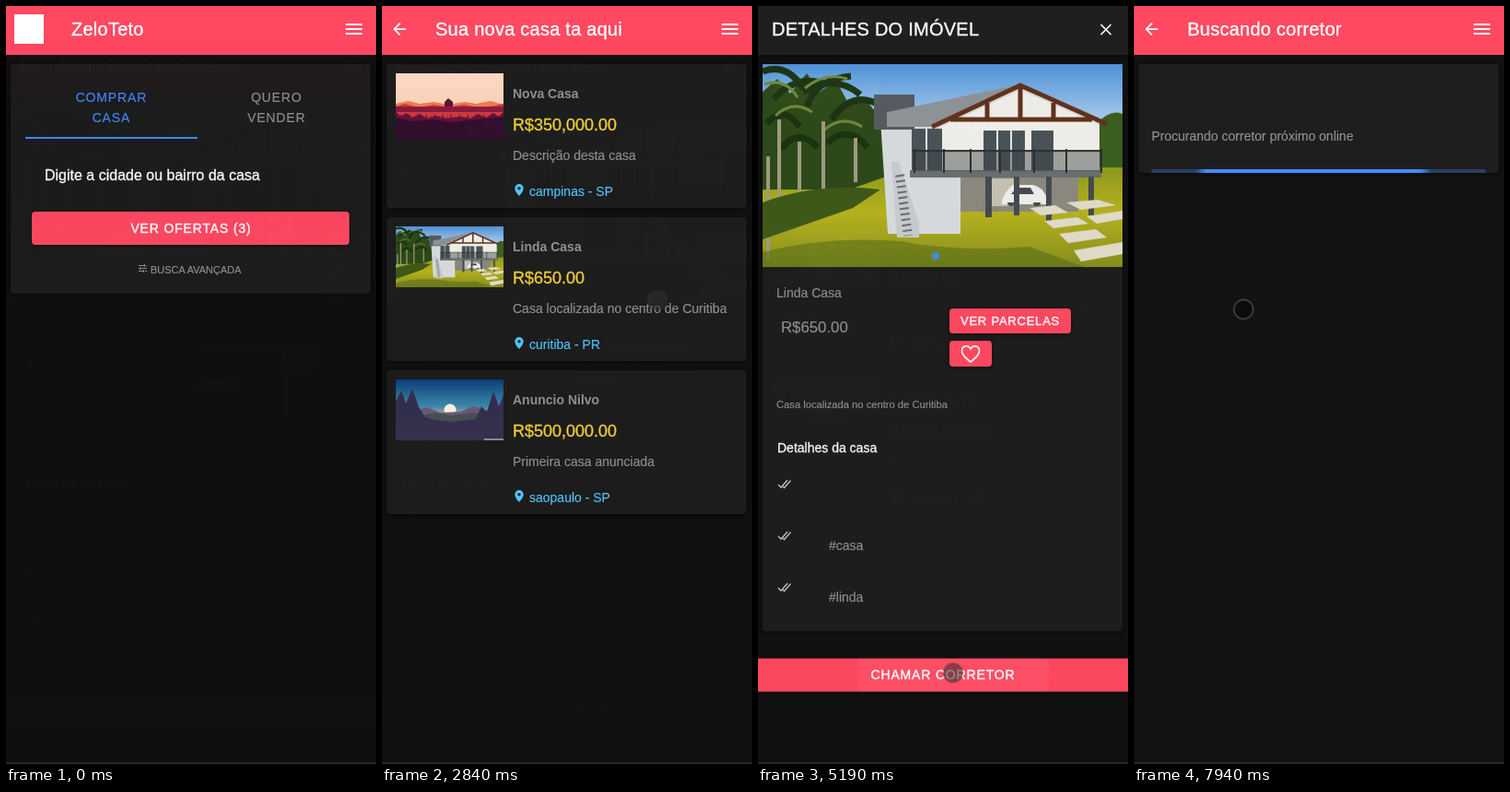
An HTML page for the animation above (8000 ms loop, 402x822 px).

```html
<!DOCTYPE html>
<html lang="pt-BR">
<head>
<meta charset="utf-8">
<title>Casas</title>
<style>
html, body { margin: 0; width: 100%; height: 100%; overflow: hidden; background: #121212; }
svg.stage { display: block; width: 402px; height: 822px; }
text {
  font: 14px "Liberation Sans", Arial, sans-serif;
  color: #929292; fill: currentColor; stroke: currentColor; stroke-width: .15px;
}
.title { font-size: 20px; letter-spacing: .0125em; color: #fff; stroke-width: .35px; }
.caps { letter-spacing: .06em; text-anchor: middle; }
.white { color: #fff; fill: #fff; stroke-width: .3px; }
.caps.white { stroke-width: .4px; }
.blue { color: #428cff; fill: #428cff; }
.pink { fill: #ff4961; }
.button { fill: #ff4961; filter: drop-shadow(0 1px 2px rgba(0, 0, 0, .4)); }
.page { fill: #121212; }
.card { fill: #1e1e1e; filter: drop-shadow(0 1px 2px rgba(0, 0, 0, .5)); }
.name { font-weight: bold; stroke: none; }
.price { font-size: 18px; color: #f6d238; stroke-width: .3px; }
.place { color: #50c8ff; fill: #50c8ff; }
.line { fill: none; stroke: #fff; stroke-width: 2; }

/* Delays are times within the 8 s loop; the script rewinds them all. */
#list { animation: rise 280ms 1268ms cubic-bezier(.36, .66, .04, 1) both; }
#offers { animation: show 1ms 1700ms both; }
#search { animation: rise 280ms 5180ms cubic-bezier(.36, .66, .04, 1) both; }
#detail {
  animation: rise 280ms 2870ms cubic-bezier(.36, .66, .04, 1) both,
    sink 200ms 5185ms cubic-bezier(.47, 0, .745, .715) forwards;
}
#shade {
  animation: shade 200ms 1262ms ease-in-out both,
    shade 200ms 1700ms ease-in-out reverse forwards;
}
#loading {
  transform-origin: 201px 409px;
  filter: drop-shadow(0 8px 10px rgba(0, 0, 0, .5));
  animation: pop 200ms 1262ms ease-in-out both, unpop 200ms 1700ms ease-in-out forwards;
}
#spinner { transform-origin: 150px 408px; animation: spin 750ms 1350ms linear infinite both; }
.ripple {
  fill: #fff; transform-box: fill-box; transform-origin: center;
  animation: grow 225ms var(--at) cubic-bezier(.4, 0, .2, 1) both, flash 400ms var(--at) both;
}
#pointer circle {
  fill: rgba(12, 12, 12, .92); stroke: rgba(84, 84, 84, .65); stroke-width: 1.8;
  animation: press 140ms 1080ms, press 70ms 2840ms, press 200ms 5050ms;
}
#pointer g { animation: show 1ms 250ms both; }

.first, .second { animation: 2044ms 5180ms linear infinite both; }
.first { animation-name: move1; }
.second { animation-name: move2; }
.first rect, .second rect {
  transform-box: fill-box; transform-origin: center;
  animation: 2044ms 5180ms linear infinite both;
}
.first rect { animation-name: size1; }
.second rect { animation-name: size2; }

@keyframes rise { from { opacity: .01; transform: translateY(40px); } to { opacity: 1; transform: none; } }
@keyframes sink { from { opacity: .99; transform: none; } to { opacity: 0; transform: translateY(40px); } }
@keyframes show { from { opacity: 0; } }
@keyframes shade { from { opacity: 0; } to { opacity: .32; } }
@keyframes pop { from { opacity: .01; transform: scale(1.1); } to { opacity: 1; transform: none; } }
@keyframes unpop { from { opacity: 1; transform: none; } to { opacity: 0; transform: scale(.9); } }
@keyframes spin { to { transform: rotate(360deg); } }
@keyframes grow { to { transform: translate(var(--dx), var(--dy)) scale(2.07); } }
@keyframes flash { 0%, 100% { opacity: 0; } 20%, 60% { opacity: .08; } }
@keyframes press { from, to { fill: rgba(50, 45, 47, .55); stroke: rgba(70, 60, 62, .25); } }
@keyframes move1 {
  0% { transform: translateX(0); }
  20% { transform: translateX(0); animation-timing-function: cubic-bezier(.5, 0, .701732, .495819); }
  59.15% { transform: translateX(.8367142px); animation-timing-function: cubic-bezier(.302435, .381352, .55, .956352); }
  100% { transform: translateX(2.0061106px); }
}
@keyframes size1 {
  0% { transform: scaleX(.08); }
  36.65% { transform: scaleX(.08); animation-timing-function: cubic-bezier(.334731, .12482, .785844, 1); }
  69.15% { transform: scaleX(.661479); animation-timing-function: cubic-bezier(.06, .11, .6, 1); }
  100% { transform: scaleX(.08); }
}
@keyframes move2 {
  0% { transform: translateX(0); animation-timing-function: cubic-bezier(.15, 0, .515058, .409685); }
  25% { transform: translateX(.3765191px); animation-timing-function: cubic-bezier(.31033, .284058, .8, .733712); }
  48.35% { transform: translateX(.8438617px); animation-timing-function: cubic-bezier(.4, .627035, .6, .902026); }
  100% { transform: translateX(1.6027778px); }
}
@keyframes size2 {
  0% { transform: scaleX(.08); animation-timing-function: cubic-bezier(.205028, .057051, .57661, .453971); }
  19.15% { transform: scaleX(.457104); animation-timing-function: cubic-bezier(.152313, .196432, .648374, 1.004315); }
  44.15% { transform: scaleX(.72796); animation-timing-function: cubic-bezier(.257759, -.003163, .211762, 1.38179); }
  100% { transform: scaleX(.08); }
}
</style>
</head>
<body>
<svg class="stage" viewBox="0 0 402 822">
  <defs>
    <linearGradient id="day" x2="0" y2="1"><stop stop-color="#4f94da"/><stop offset=".45" stop-color="#e6f0f8"/></linearGradient>
    <linearGradient id="dawn" x2="0" y2="1"><stop stop-color="#fddcc4"/><stop offset="1" stop-color="#fdd0b2"/></linearGradient>
    <linearGradient id="night" x2="0" y2="1"><stop stop-color="#0d3f7a"/><stop offset=".45" stop-color="#3f8cae"/><stop offset=".6" stop-color="#d9a59a"/></linearGradient>
    <linearGradient id="lawn" x2="0" y2="1"><stop stop-color="#8f9a1e"/><stop offset=".45" stop-color="#b9b420"/><stop offset="1" stop-color="#868f1c"/></linearGradient>
    <pattern id="firs" width="9" height="14" patternUnits="userSpaceOnUse">
      <path d="M0 14V9l2-5 2 5 2-8 3 9v4z" fill="#8c1c3c"/>
    </pattern>
    <clipPath id="offerClip"><rect x="28" y="223" width="345" height="36" rx="4"/></clipPath>
    <clipPath id="callClip"><rect y="707.5" width="402" height="36"/></clipPath>

    <g id="bar">
      <rect class="pink" width="402" height="53"/>
      <path class="line" d="M369 20h18M369 25h18M369 30h18"/>
    </g>
    <path id="back" fill="#fff" transform="translate(8.5 14.5) scale(.875)" d="M20 11H7.83l5.59-5.59L12 4l-8 8 8 8 1.41-1.41L7.83 13H20z"/>
    <path id="pin" class="place" fill-rule="evenodd" d="M149 193a4.700 4.700 0 0 0-4.700 4.700c0 3.500 4.700 8.300 4.700 8.300s4.700-4.800 4.700-8.300a4.700 4.700 0 0 0-4.700-4.700zm0 3a1.700 1.700 0 1 1 0 3.400 1.700 1.700 0 0 1 0-3.400z"/>
    <path id="checks" fill="none" stroke="#ccc" stroke-width="1.200" d="M22 519l3 3 7-8M27 521l1.500 1.500 7-8"/>

    <symbol id="house" viewBox="0 0 391 220" preserveAspectRatio="none">
      <rect width="391" height="220" fill="url(#day)"/>
      <path fill="#3c5f20" d="M335 80q10-16 25-12 16-20 31-14v66h-56z"/>
      <rect y="112" width="391" height="108" fill="url(#lawn)"/>
      <path fill="#2e4a1a" d="M0 30l16-14 14 16 18-22 14 20 18-12 14 26 16-8 24 30v56l-40 14H0z"/>
      <path fill="none" stroke="#1d3413" stroke-width="7" d="M0 8q26-10 44 18M12 38q25-28 58-16M48 46q10-30 48-33M44 30q35-20 62 3M75 60q20-30 48-18M4 64q20-20 36 4M20 92q18-24 40-2M70 86q22-22 44 4"/>
      <path fill="none" stroke="#6f8a3c" stroke-width="3" d="M2 22q22-8 36 14M46 26q22-18 46-10M14 56q18-18 40-4M66 72q20-18 42-4"/>
      <path fill="none" stroke="#a09c80" stroke-width="4" d="M6 100v112M18 60v110M40 84v66M66 62v80M101 80v48"/>
      <path fill="#3f5a1a" d="M0 150q60-22 128-14l-30 20-98 34z"/>
      <path fill="#5d7019" d="M0 204q70-18 150-12 60 12 140 6l60 22H0z" opacity=".6"/>
      <path fill="#d9dcdf" d="M128 60h62l90-34 86 36v60H215v62h-79z"/>
      <path fill="#565c60" d="M121 33h44v38h-44z"/>
      <path fill="#8e9498" d="M135 52l145-30-92 46h-53z"/>
      <path fill="#f1efe9" d="M194 68l86-40 86 38v50H194z"/>
      <path fill="none" stroke="#63321c" stroke-width="5" d="M184 68l96-45 94 42M204 60h154M244 42v18M280 25v35M316 42v18"/>
      <path fill="#4a5459" d="M162 70h33v48h-33zM240 72h45v46h-45zM292 72h24v46h-24z"/>
      <path fill="none" stroke="#e6e8e8" stroke-width="2" d="M178 70v48M255 72v46M270 72v46"/>
      <path fill="#8c8a7e" d="M215 122h128v38H215z"/>
      <path fill="#c6c2b4" d="M246 124h28v30h-28z"/>
      <path fill="#efefec" d="M260 148q3-10 12-17h22q10 2 15 14v7h-49z"/>
      <path fill="#444b50" d="M270 141l6-7h15l4 7zM266 150a4 4 0 0 0 8 0zM294 150a4 4 0 0 0 8 0z"/>
      <path fill="#6b7073" d="M160 115h208v8H160z"/>
      <path fill="#3a4044" opacity=".45" d="M163 94h206v22H163z"/>
      <path fill="none" stroke="#2c3134" stroke-width="2" d="M163 94h206M165 92v26M197 92v26M226 92v26M258 92v26M295 92v26M330 92v26M368 92v26"/>
      <path fill="#454b4f" d="M242 122h7v44h-7zM273 122h6v42h-6zM308 122h6v50h-6zM354 122h6v42h-6z"/>
      <path fill="#c9cdce" d="M140 106h8l22 66v16h-24z"/>
      <path fill="none" stroke="#666d70" stroke-width="10" stroke-dasharray="2 4" d="M149 120l9 66"/>
      <path fill="#e2ddca" d="M290 156l28-3 14 8-30 3zM330 150l34-3 20 6-38 5zM306 170l36-4 12 7-38 5zM352 165l39-6v9l-28 5zM322 184l40-5 12 9-42 6zM338 202l53-9v13l-45 8z"/>
    </symbol>
  </defs>

  <g id="home">
    <rect class="page" width="402" height="822"/>
    <use href="#bar"/>
    <rect x="9" y="9" width="32" height="32" fill="#fff"/>
    <text class="title" x="71" y="32">ZeloTeto</text>
    <rect class="card" x="5" y="63" width="391" height="249" rx="4"/>
    <text class="caps blue" x="114.400" y="104">COMPRAR</text>
    <text class="caps blue" x="114.400" y="126">CASA</text>
    <text class="caps" x="293.900" y="104">QUERO</text>
    <text class="caps" x="293.900" y="126">VENDER</text>
    <rect class="blue" x="21" y="142" width="187" height="2"/>
    <text class="white" x="42" y="189" style="font-size:16px">Digite a cidade ou bairro da casa</text>
    <rect class="button" x="28" y="223" width="345" height="36" rx="4"/>
    <text class="caps white" x="201" y="246">VER OFERTAS (3)</text>
    <g clip-path="url(#offerClip)"><circle class="ripple" cx="146" cy="243" r="86" style="--at:1260ms;--dx:54.500px;--dy:-2px"/></g>
    <path fill="none" stroke="#929292" d="M144 281.500h6M152 281.500h1M144 284.500h2M148 284.500h5M144 287.500h5M151 287.500h2M150.500 280v3M146.500 283v3M149.500 286v3"/>
    <text x="157" y="290" style="font-size:11px">BUSCA AVANÇADA</text>
  </g>

  <g id="list">
    <rect class="page" width="402" height="822"/>
    <use href="#bar"/><use href="#back"/>
    <text class="title" x="58" y="32">Sua nova casa ta aqui</text>
    <g id="offers">
      <g>
        <rect class="card" x="5" y="63" width="391" height="156" rx="4"/>
        <svg x="15" y="73" width="117" height="72">
          <rect width="117" height="72" fill="url(#dawn)"/>
          <path fill="#f47a50" d="M0 33l14-3 12 3 15-2 16 3 18-3 12 2 16-3 14 4v20H0z"/>
          <path fill="#d23a3e" d="M0 36l10-3 14 4 18-3 14 3 18-3 20 4 23-5v24H0z"/>
          <path fill="#5a1a30" d="M53 31l4-4 5 4v11h-9z"/>
          <rect y="36" width="117" height="14" fill="url(#firs)"/>
          <path fill="#63143a" d="M0 42l6 5 5-4 7 5 8-4 8 5 9-3 12 3 16-2 10 2 8-5 9 4 8-5 6 4 5-5v30H0z"/>
          <path fill="#34102f" d="M0 48l18 4 22-2 20 3 28-3 29-3v25H0z"/>
        </svg>
        <text class="name" x="142" y="100">Nova Casa</text>
        <text class="price" x="142" y="135">R$350,000.00</text>
        <text x="142" y="167">Descrição desta casa</text>
        <use href="#pin"/><text class="place" x="160" y="206">campinas - SP</text>
      </g>
      <g transform="translate(0 166)">
        <rect class="card" x="5" y="63" width="391" height="156" rx="4"/>
        <use href="#house" x="15" y="73" width="117" height="66"/>
        <text class="name" x="142" y="100">Linda Casa</text>
        <text class="price" x="142" y="135">R$650.00</text>
        <text x="142" y="167">Casa localizada no centro de Curitiba</text>
        <use href="#pin"/><text class="place" x="160" y="206">curitiba - PR</text>
      </g>
      <g transform="translate(0 332)">
        <rect class="card" x="5" y="63" width="391" height="156" rx="4"/>
        <svg x="15" y="73" width="117" height="66">
          <rect width="117" height="66" fill="url(#night)"/>
          <circle cx="59" cy="33" r="6.500" fill="#fff2e0"/>
          <path fill="#6a5a78" d="M20 34l14-4 14 6 22-1 14-6 18 5v14H20z"/>
          <path fill="#4a4f55" d="M20 40l24-4 16 3 25-3 20 4v8H20z"/>
          <path fill="#343050" d="M0 24l6-12 5 14 7-16 7 20 6 10 10 4 20 2 26-3 6-14 6 6 7-22 6 16 5-12v49H0z"/>
          <path fill="#39324f" d="M0 44l40 2 35 1 42-5v24H0z"/>
          <rect x="96" y="64" width="21" height="2" fill="#8d8a99"/>
        </svg>
        <text class="name" x="142" y="100">Anuncio Nilvo</text>
        <text class="price" x="142" y="135">R$500,000.00</text>
        <text x="142" y="167">Primeira casa anunciada</text>
        <use href="#pin"/><text class="place" x="160" y="206">saopaulo - SP</text>
      </g>
    </g>
  </g>

  <g id="search">
    <rect class="page" width="402" height="822"/>
    <use href="#bar"/><use href="#back"/>
    <text class="title" x="58" y="32">Buscando corretor</text>
    <rect class="card" x="5" y="63" width="391" height="118" rx="4"/>
    <text x="19" y="146">Procurando corretor próximo online</text>
    <svg x="19" y="177" width="363" height="4" viewBox="0 0 1 1" preserveAspectRatio="none">
      <rect class="blue" width="1" height="1" opacity=".3"/>
      <g class="blue" transform="matrix(-1 0 0 1 1 0)">
        <g class="first"><rect x="-1.45166611" width="1" height="1"/></g>
        <g class="second"><rect x="-.54888891" width="1" height="1"/></g>
      </g>
    </svg>
  </g>

  <g id="detail">
    <rect class="page" width="402" height="822"/>
    <rect class="card" y="-4" width="402" height="57"/>
    <text class="title" x="15" y="32">DETALHES DO IMÓVEL</text>
    <path class="line" style="stroke-width:1.700" d="M372.500 20l11 11M383.500 20l-11 11"/>
    <rect class="card" x="5" y="63" width="391" height="615" rx="4"/>
    <use href="#house" x="5" y="63" width="391" height="220"/>
    <circle class="blue" cx="193" cy="271" r="4" opacity=".9"/>
    <text x="20" y="316">Linda Casa</text>
    <text x="25" y="354" style="font-size:16.800px">R$650.00</text>
    <rect class="button" x="208" y="328" width="132" height="27" rx="4"/>
    <text class="caps white" x="274" y="346" style="font-size:13px">VER PARCELAS</text>
    <rect class="button" x="208" y="363" width="46" height="28" rx="4"/>
    <path class="line" style="stroke-width:1.600" d="M231 386c-6-5-9.500-8-9.500-12 0-6 7-7 9.500-2 2.500-5 9.500-4 9.500 2 0 4-3.500 7-9.500 12z"/>
    <text x="20" y="436" style="font-size:11.200px">Casa localizada no centro de Curitiba</text>
    <text class="white" x="21" y="484">Detalhes da casa</text>
    <use href="#checks"/><use href="#checks" y="56"/><use href="#checks" y="112"/>
    <text x="77" y="590">#casa</text>
    <text x="77" y="646">#linda</text>
    <rect class="button" y="707.5" width="402" height="36"/>
    <text class="caps white" x="201" y="730">CHAMAR CORRETOR</text>
    <g clip-path="url(#callClip)"><circle class="ripple" cx="212" cy="724" r="100.500" style="--at:5165ms;--dx:-11px;--dy:1px"/></g>
  </g>

  <rect id="shade" width="402" height="822"/>
  <g id="loading">
    <rect x="111.500" y="369" width="179" height="80" rx="2" fill="#1e1e1e"/>
    <path id="spinner" fill="none" stroke="#428cff" stroke-width="2.600" d="M159.900 414.400a11.800 11.800 0 0 1-19.800 0"/>
    <text class="white" x="179.300" y="414">Carregando...</text>
  </g>

  <rect y="820" width="402" height="2" fill="#272727"/>
  <g id="pointer"><g><circle r="10.500"/></g></g>
</svg>
<script>
const LOOP = 8000;
// time, x, y
const path = [
  [0, 305, 774], [250, 305, 774], [520, 210, 520], [800, 103, 262], [900, 122, 216], [1010, 146, 243],
  [2050, 146, 243], [2500, 245, 288], [2780, 299, 319], [3080, 299, 319], [3400, 200, 385],
  [3720, 114, 450], [4260, 199, 738], [4430, 199, 738], [4590, 212, 724], [5250, 212, 723],
  [5500, 212, 718], [5880, 212, 718], [6640, 230, 610], [7450, 135, 362], [7800, 119, 329], [LOOP, 119, 329]
];
document.getElementById("pointer").animate(
  path.map(([t, x, y]) => ({ offset: t / LOOP, transform: `translate(${x}px, ${y}px)` })),
  { duration: LOOP, fill: "both" }
);

const parts = document.getAnimations();
parts.forEach(part => part.pause());
const start = performance.now();

function tick() {
  const time = (performance.now() - start) % LOOP;
  for (const part of parts) part.currentTime = time;
  requestAnimationFrame(tick);
}
tick();
</script>
</body>
</html>
```
